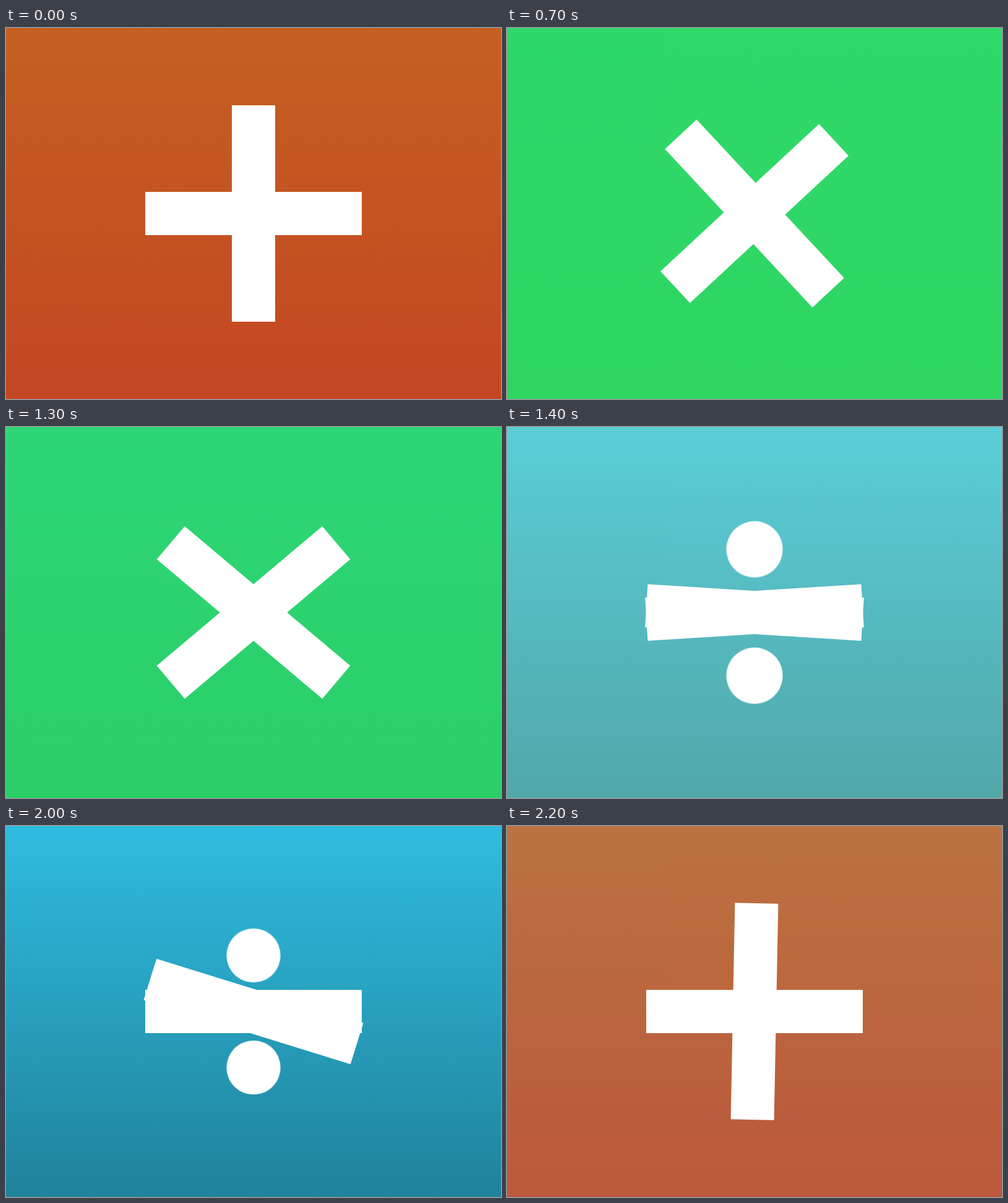
An HTML page for the animation above (2250 ms loop, 800 px wide and 600 px high).

```html
<!DOCTYPE html>
<html lang="en">
<head>
<meta charset="utf-8">
<title>Plus, times, divide</title>
<style>
  html, body { margin: 0; width: 100%; height: 100%; overflow: hidden; background: #fff; }
  .sky, .bar, .dot { position: absolute; animation: 2250ms infinite; }

  .sky { inset: 0; animation-timing-function: ease-in-out; }
  .plus { background: linear-gradient(#c46021, #c44623); animation-name: plus; }
  .times { background: linear-gradient(#18d65c, #17d352); animation-name: times; }
  .divide { background: linear-gradient(#2fbce0, #20829b); animation-name: divide; }

  .bar, .dot { background: #fff; animation-timing-function: cubic-bezier(.4, .1, .5, 1); }
  .bar { left: 225px; top: 265px; width: 350px; height: 70px; }
  .level { animation-name: level; }
  .upright { animation-name: upright; }

  .dot { left: 351px; top: 251px; width: 98px; height: 98px; border-radius: 50%; animation-name: dot; }
  .above { --far: -111px; --over: -116px; }
  .below { --far: 111px; --over: 116px; }

  /* Background crossfades */
  @keyframes plus {
    0%, 21.9% { opacity: 1; }
    33.7%, 88.7% { opacity: 0; }
    100% { opacity: 1; }
  }
  @keyframes times {
    0%, 21.9% { opacity: 0; }
    33.7%, 55.2% { opacity: 1; }
    67%, 100% { opacity: 0; }
  }
  @keyframes divide {
    0%, 55.2% { opacity: 0; }
    67%, 88.7% { opacity: 1; }
    100% { opacity: 0; }
  }

  /* Each turn swings slightly past its end, then settles */
  @keyframes level {
    0%, 22.62% { transform: rotate(0deg); }
    30.84% { transform: rotate(47.07deg); animation-timing-function: ease-in-out; }
    37.78%, 56.36% { transform: rotate(45deg); }
    64.58% { transform: rotate(-2.07deg); animation-timing-function: ease-in-out; }
    72.9%, 100% { transform: rotate(0deg); }
  }
  @keyframes upright {
    0%, 22.62% { transform: rotate(90deg); }
    30.84% { transform: rotate(137.07deg); animation-timing-function: ease-in-out; }
    37.78%, 56.36% { transform: rotate(135deg); }
    64.58% { transform: rotate(182.07deg); animation-timing-function: ease-in-out; }
    72.9%, 86.89% { transform: rotate(180deg); }
    95.11% { transform: rotate(274.14deg); animation-timing-function: ease-out; }
    100% { transform: rotate(270deg); }
  }
  @keyframes dot {
    0%, 56.36% { transform: translateY(0) scale(.4); }
    64.58% { transform: translateY(var(--over)) scale(1); animation-timing-function: ease-in-out; }
    72.9%, 86.89% { transform: translateY(var(--far)) scale(1); }
    95.11%, 100% { transform: translateY(0) scale(.4); }
  }
</style>
</head>
<body>
  <div class="sky plus"></div>
  <div class="sky times"></div>
  <div class="sky divide"></div>
  <div class="dot above"></div>
  <div class="dot below"></div>
  <div class="bar level"></div>
  <div class="bar upright"></div>
<script>
  // Hold every pose for 50 ms
  const LOOP = 2250, STEP = 50;
  const motions = document.getAnimations();
  const start = performance.now();
  motions.forEach(m => m.pause());

  function tick() {
    const t = (performance.now() - start) % LOOP;
    const held = Math.floor(t / STEP) * STEP;
    motions.forEach(m => { m.currentTime = held; });
    requestAnimationFrame(tick);
  }
  tick();
</script>
</body>
</html>
```
